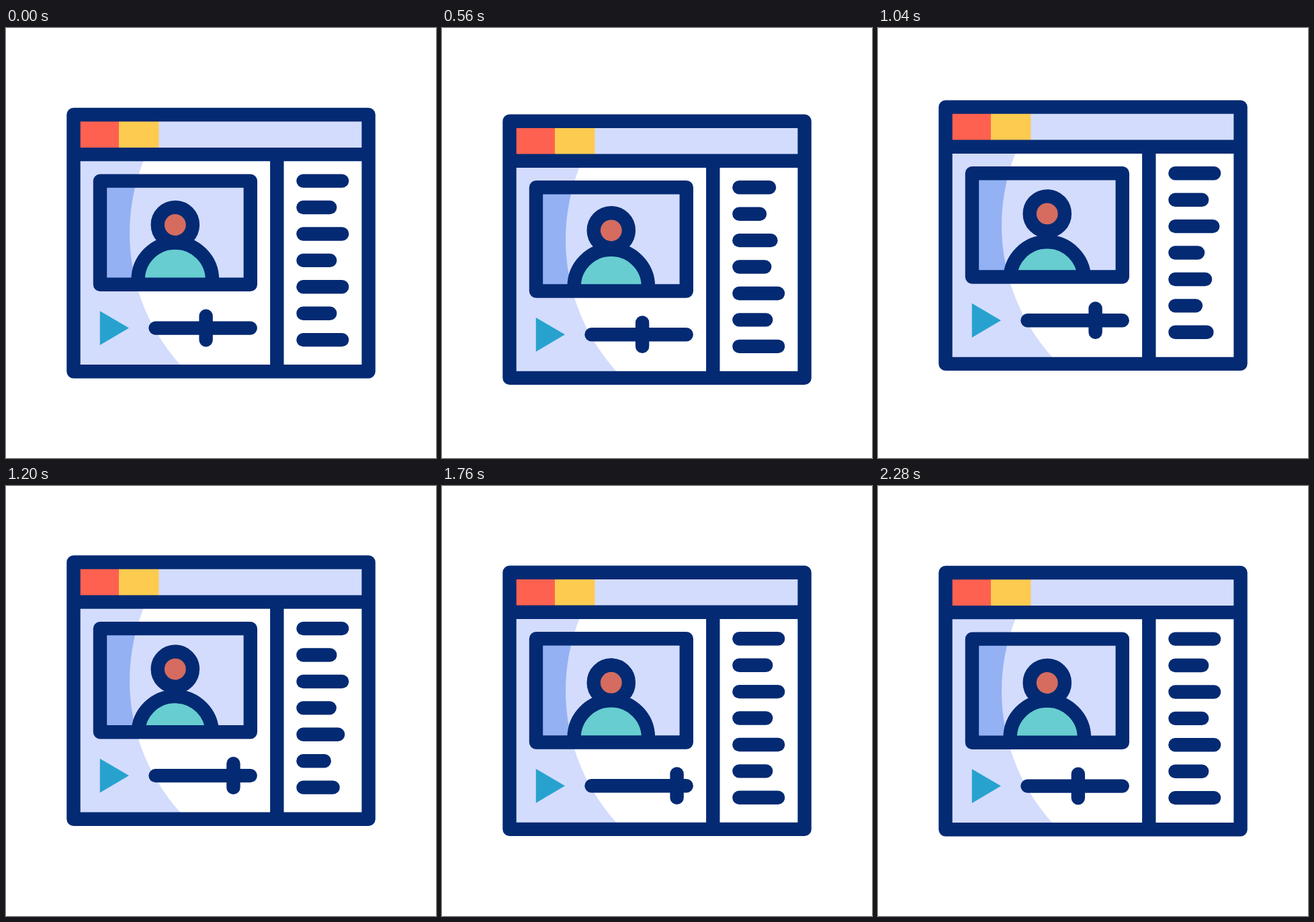
Write an HTML page that moves like this. It is 640x640 px and loops after 2360 ms.

```html
<!DOCTYPE html>
<html lang="en">
<head>
<meta charset="utf-8">
<title>Video page</title>
<style>
  html, body { margin: 0; width: 100%; height: 100%; overflow: hidden; background: #fff; }
  svg { display: block; width: 100%; height: 100%; }
  .line { fill: none; stroke: #032a73; stroke-width: 20.4; stroke-linecap: round; stroke-linejoin: round; }
</style>
</head>
<body>
<svg viewBox="0 0 640 640">
  <defs>
    <clipPath id="panelClip"><rect x="100" y="188" width="303" height="323"/></clipPath>
    <clipPath id="videoClip"><rect x="140" y="227.6" width="223.8" height="154.4"/></clipPath>
  </defs>
  <g id="page">
    <rect x="100" y="129" width="440" height="59" fill="#d3dcfd"/>
    <rect x="100" y="129" width="68" height="59" fill="#ff6150"/>
    <rect x="168" y="129" width="59.5" height="59" fill="#fdcb50"/>
    <g clip-path="url(#panelClip)">
      <rect x="100" y="188" width="303" height="323" fill="#d3dcfd"/>
      <circle cx="476" cy="305.4" r="292" fill="#fff"/>
    </g>
    <g clip-path="url(#videoClip)">
      <rect x="140" y="227" width="224" height="156" fill="#94b1f3"/>
      <circle cx="476" cy="305.4" r="292" fill="#d3dcfd"/>
      <circle id="body" class="line" cx="251.8" cy="374.8" r="55.2" style="fill:#67cdd0"/>
      <circle id="head" class="line" cx="251.8" cy="293" r="26.1" style="fill:#d56c5f"/>
    </g>
    <rect class="line" x="140" y="227.6" width="223.8" height="154.2"/>
    <path fill="#27a2cf" d="M139.8 421.2 183 446.6 139.8 472Z"/>
    <path class="line" d="M222.5 446.6H363.7"/>
    <path id="knob" class="line" d="M297.6 428.8V464.2"/>
    <path class="line" d="M100.5 129H539.6V511.2H100.5ZM100.5 188.1H539.6M403.3 188.1V511.2"/>
    <g id="rows"></g>
  </g>
</svg>
<script>
const LOOP = 2360, STEP = 40;
const byId = id => document.getElementById(id);
const [page, body, head, knob, rowGroup] = ['page', 'body', 'head', 'knob', 'rows'].map(byId);

const rows = Array.from({ length: 7 }, () => {
  const row = document.createElementNS('http://www.w3.org/2000/svg', 'path');
  row.setAttribute('class', 'line');
  return rowGroup.appendChild(row);
});

// cubic-bezier(.6, 0, .4, 1)
function ease(x) {
  if (x <= 0) return 0;
  if (x >= 1) return 1;
  let low = 0, high = 1;
  for (let i = 0; i < 24; i++) {
    const s = (low + high) / 2, r = 1 - s;
    if (1.8 * s * r * r + 1.2 * s * s * r + s * s * s < x) low = s; else high = s;
  }
  return low * low * (3 - 2 * low);
}

// Keys are [step, value] pairs, eased between neighbours.
function track(keys, k) {
  return keys.slice(1).reduce((value, [end, to], i) => {
    const [start, from] = keys[i];
    return value + (to - from) * ease((k - start) / (end - start));
  }, keys[0][1]);
}

const shift = (el, x, y) => el.setAttribute('transform', `translate(${x.toFixed(3)} ${y.toFixed(3)})`);

function draw(time) {
  const k = Math.max(0, Math.min(56, Math.floor(time / STEP) - 1));
  shift(page, 0, track([[0, 0], [15, 9.9], [30, -15.6], [45, 0]], k));
  shift(head, 0, track([[5, 0], [25, -5.2], [45, 0]], k));
  shift(body, 0, track([[10, 0], [25, 10], [40, 0]], k));
  shift(knob, track([[10, 0], [40, 52], [43, 52], [57, 0]], k), 0);
  rows.forEach((row, i) => {
    const [end, cut] = i % 2 ? [482.2, 9.3] : [500.1, 13.5];
    const x = end - cut * track([[0, 0], [11, 1], [22.5, 0]], k - 3 * i);
    row.setAttribute('d', `M442.4 ${227.6 + 39.42 * i}H${x.toFixed(3)}`);
  });
}

const began = performance.now();
function tick() {
  draw((performance.now() - began) % LOOP);
  requestAnimationFrame(tick);
}
draw(0);
requestAnimationFrame(tick);
</script>
</body>
</html>
```
